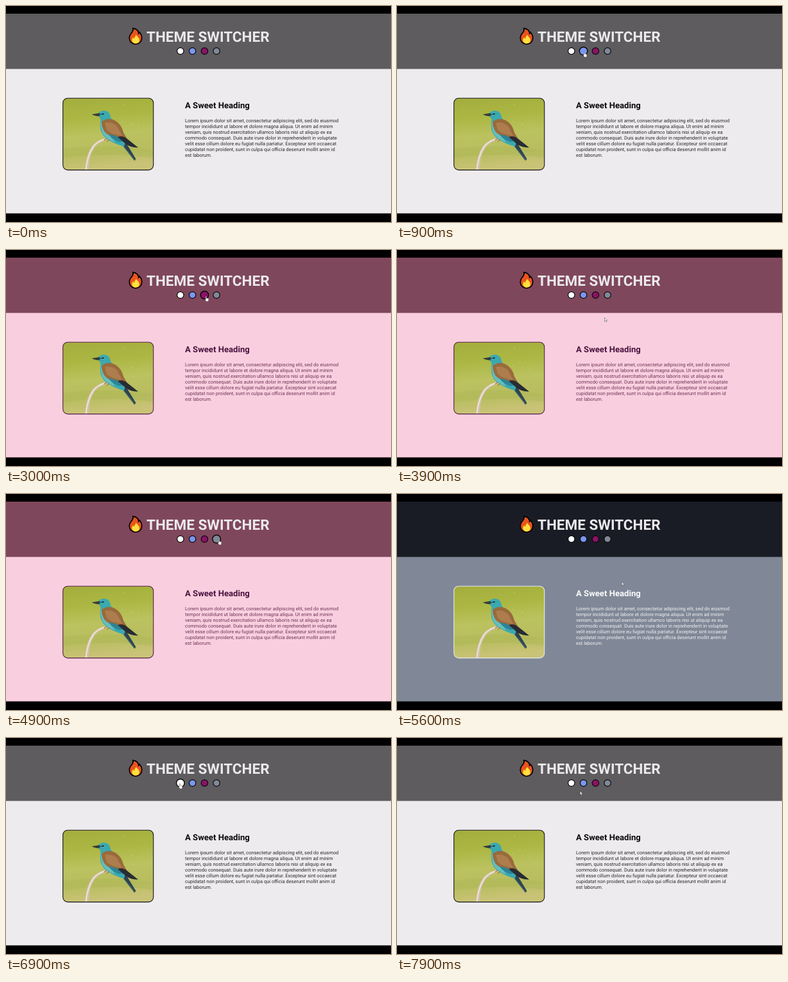
Recreate the animation shown at these times as an HTML page. Size 600x338 px, loop 8 s.

```html
<!DOCTYPE html>
<html lang="en">
<head>
<meta charset="utf-8">
<title>Theme Switcher</title>
<style>
  html, body { margin: 0; width: 100%; height: 100%; overflow: hidden; background: #000; }
  svg { display: block; width: 100vw; height: 100vh; }
  text { font-family: Roboto, sans-serif; text-rendering: geometricPrecision; }
  .title { font-size: 22.5px; font-weight: 700; fill: #ebe9ec; }
  .head { font-size: 13.125px; font-weight: 700; }
  .para { font-size: 7.5px; }
</style>
</head>
<body>
<svg viewBox="0 0 600 338" preserveAspectRatio="none">
  <defs>
    <linearGradient id="meadow" x1="0" y1="0" x2="0.12" y2="1">
      <stop offset="0" stop-color="#a3ad3c"/>
      <stop offset="0.3" stop-color="#acb743"/>
      <stop offset="0.55" stop-color="#bbc25f"/>
      <stop offset="0.8" stop-color="#b9bd5f"/>
      <stop offset="1" stop-color="#c9c377"/>
    </linearGradient>
    <clipPath id="frame"><rect x="89" y="144.5" width="140.5" height="112" rx="7"/></clipPath>
  </defs>

  <rect width="600" height="338" fill="#000"/>
  <rect id="page" y="12" width="600" height="312.5"/>
  <rect id="bar" y="12" width="600" height="86.5"/>

  <!-- flame -->
  <g stroke-linejoin="round">
    <path d="M197.6 34.8C203.8 35.6 206.6 39.4 206.6 43.6C207.2 42.8 207.6 41.8 207.5 40.6C210.6 43.5 212 47.4 211.6 51.2C211 56.6 207 59.6 202 59.6C196.6 59.6 192.6 56.2 192.3 50.8C192.1 47.4 193.6 44.4 195.6 42.2C197.6 40 198.6 37.6 197.6 34.8Z" fill="#e9541d" stroke="#000" stroke-width="1.7"/>
    <path d="M203 45.2C204 48 207.8 49.2 207.8 53.3C207.8 56.7 205.3 58.7 202.2 58.7C199 58.7 196.4 56.6 196.4 53.4C196.4 51.6 197.2 50.2 198.3 49.1C198.6 50.3 199.2 51 200.1 51.3C200 48.9 201.4 47.2 203 45.2Z" fill="#fde23c"/>
  </g>
  <text class="title" x="219" y="56">THEME SWITCHER</text>
  <g id="dots" stroke="#08080a" stroke-width="1.2"></g>

  <!-- picture -->
  <g clip-path="url(#frame)">
    <rect x="88" y="144" width="143" height="113" fill="url(#meadow)"/>
    <path d="M88 224Q150 214 231 226V238Q160 228 88 238Z" fill="#a9b453" opacity=".4"/>
    <path d="M122.500 258L125 241Q127.500 228 134 219Q141 210 155 206.500L158 209Q144 214 138.500 221Q131.500 230 130 243L128 258Z" fill="#d3c2ac"/>
    <path d="M124.500 257Q126 236 136 220Q142 212 153 208.500" fill="none" stroke="#f2e7d8" stroke-width="1.600"/>
    <path d="M176 211L184 209L202.500 239.500L200 242Z" fill="#2c4450"/>
    <path d="M181 217L201 241.500" stroke="#527982" stroke-width="1"/>
    <path d="M144.500 167Q148 163.200 154 163.800Q161 164.800 162.500 172Q163 177 170 181Q180 190 186 213L184 220Q172 217 160 210Q149 203 147 192Q146.500 184 147.500 177Q144 173 144.500 167Z" fill="#3ba9af"/>
    <path d="M148 180Q147 192 151 200Q158 210 170 213L160 199Z" fill="#64bfc0"/>
    <path d="M149 181Q157 175 166 177.500Q179 182 183 198L190 210L177 208Q160 205 153 196Q149 189 149 181Z" fill="#9a6a3c"/>
    <path d="M154 183Q164 180 173 188L181 203Q165 202 157 194Z" fill="#ad7d4d"/>
    <path d="M160 201Q173 202 183 211L177 213Q166 210 160 201Z" fill="#2b8597"/>
    <path d="M174 205Q182 202 189 208L206 221.500Q197 222 188 217Z" fill="#282c33"/>
    <path d="M146 167.500L134 169.500Q137 172.200 146 172.500Z" fill="#333c3f"/>
    <path d="M144.500 170L153 168.800" stroke="#24464c" stroke-width="1.200"/>
    <circle cx="150.800" cy="168.900" r="1" fill="#10191c"/>
    <path d="M157 207L153 210M161 209L157 212" stroke="#a87951" stroke-width="1.300"/>
    <g fill="#e9edc4"><circle cx="183" cy="154" r=".6"/><circle cx="181" cy="181" r=".6"/><circle cx="196" cy="184" r=".6"/><circle cx="207" cy="187" r=".5"/></g>
  </g>
  <rect id="edge" x="88.7" y="144.200" width="141" height="112.400" rx="7.500" fill="none" stroke-width="1.100"/>

  <text id="head" class="head" x="279" y="160.2">A Sweet Heading</text>
  <g id="para" class="para"></g>

  <g id="arrow" stroke="#3b3b45" stroke-width=".5" fill="#fff" stroke-linejoin="round">
    <path d="M0 0V5.700L1.300 4.500L2.200 6.600L3.200 6.200L2.300 4.100H4.100Z"/>
  </g>
  <g id="hand" stroke="#333" stroke-width=".4" fill="#fff" stroke-linejoin="round">
    <path d="M-.7 .3Q0 -.5 .6 .3V2.800L3 3.300Q4 3.600 3.900 4.600L3.300 8H.1L-1.700 5.200Q-2 4.200 -.7 4.600Z"/>
  </g>
</svg>
<script>
const $ = id => document.getElementById(id);
const NS = "http://www.w3.org/2000/svg";
const LOOP = 8000, STEP = 100, DOT_Y = 70.5;

function add(parent, tag, attrs, text = "") {
  const el = document.createElementNS(NS, tag);
  for (const k in attrs) el.setAttribute(k, attrs[k]);
  el.textContent = text;
  return parent.appendChild(el);
}

const themes = {
  light: { bar: "#5e5c5f", page: "#edebee", head: "#09090b", para: "#29282b", edge: "#111" },
  blue:  { bar: "#5f718b", page: "#c3d7fb", head: "#34305a", para: "#48496f", edge: "#353158" },
  pink:  { bar: "#7f475b", page: "#f9cfdf", head: "#4b123f", para: "#6e3556", edge: "#571a42" },
  dark:  { bar: "#1a1c25", page: "#808897", head: "#fafafa", para: "#f1f1f3", edge: "#e9eaec" }
};
const switches = [[0, "light"], [1100, "blue"], [3000, "pink"], [5100, "dark"], [6800, "light"]];

// pointer stops: time, x, y
const path = [
  [100, 308, 108], [800, 292, 72], [1500, 292, 72], [1700, 298, 107], [2000, 298, 107],
  [2100, 297, 105], [2400, 303, 99], [2800, 312, 72.5], [3200, 312, 72.5], [3600, 321, 108],
  [4100, 325, 105], [4600, 332, 71.5], [5200, 332, 71.5], [5600, 350.2, 137.6],
  [5900, 343, 132], [6500, 271, 71.5], [7100, 271, 71.5], [7500, 284, 89], [7900, 285.3, 83.3]
];

const lines = [
  "Lorem ipsum dolor sit amet, consectetur adipiscing elit, sed do eiusmod",
  "tempor incididunt ut labore et dolore magna aliqua. Ut enim ad minim",
  "veniam, quis nostrud exercitation ullamco laboris nisi ut aliquip ex ea",
  "commodo consequat. Duis aute irure dolor in reprehenderit in voluptate",
  "velit esse cillum dolore eu fugiat nulla pariatur. Excepteur sint occaecat",
  "cupidatat non proident, sunt in culpa qui officia deserunt mollit anim id",
  "est laborum."
];
lines.forEach((s, i) => add($("para"), "text", { x: 279, y: 182 + 9 * i }, s));

const dots = [[271.8, "#fff"], [290.6, "#7b96ef"], [309.4, "#891366"], [328.1, "#808897"]]
  .map(([x, fill]) => ({ x, el: add($("dots"), "circle", { r: 5.2, fill }) }));

function pointerAt(t) {
  if (t < path[0][0]) return null;
  const i = path.findIndex(p => p[0] > t);
  if (i < 0) return path[path.length - 1].slice(1);
  const [t0, x0, y0] = path[i - 1], [t1, x1, y1] = path[i];
  const u = (t - t0) / (t1 - t0), e = u * u * (3 - 2 * u);
  return [x0 + (x1 - x0) * e, y0 + (y1 - y0) * e];
}

function place(el, pos, on) {
  el.style.display = on ? "" : "none";
  if (on) el.setAttribute("transform", `translate(${pos})`);
}

function draw(ms) {
  const t = Math.floor((ms % LOOP) / STEP) * STEP;
  const theme = themes[switches.filter(s => s[0] <= t).pop()[1]];
  for (const k of ["bar", "page", "head", "para"]) $(k).setAttribute("fill", theme[k]);
  $("edge").setAttribute("stroke", theme.edge);

  const pos = pointerAt(t);
  let over = false;
  for (const { x, el } of dots) {
    const hit = pos && Math.hypot(pos[0] - x, pos[1] - DOT_Y) < 6;
    over = over || hit;
    el.setAttribute("transform", `translate(${x} ${DOT_Y}) scale(${hit ? 1.2 : 1})`);
  }
  place($("arrow"), pos, pos && !over);
  place($("hand"), pos, pos && over);
}

const start = performance.now();
function tick() {
  draw(performance.now() - start);
  requestAnimationFrame(tick);
}
tick();
</script>
</body>
</html>
```
